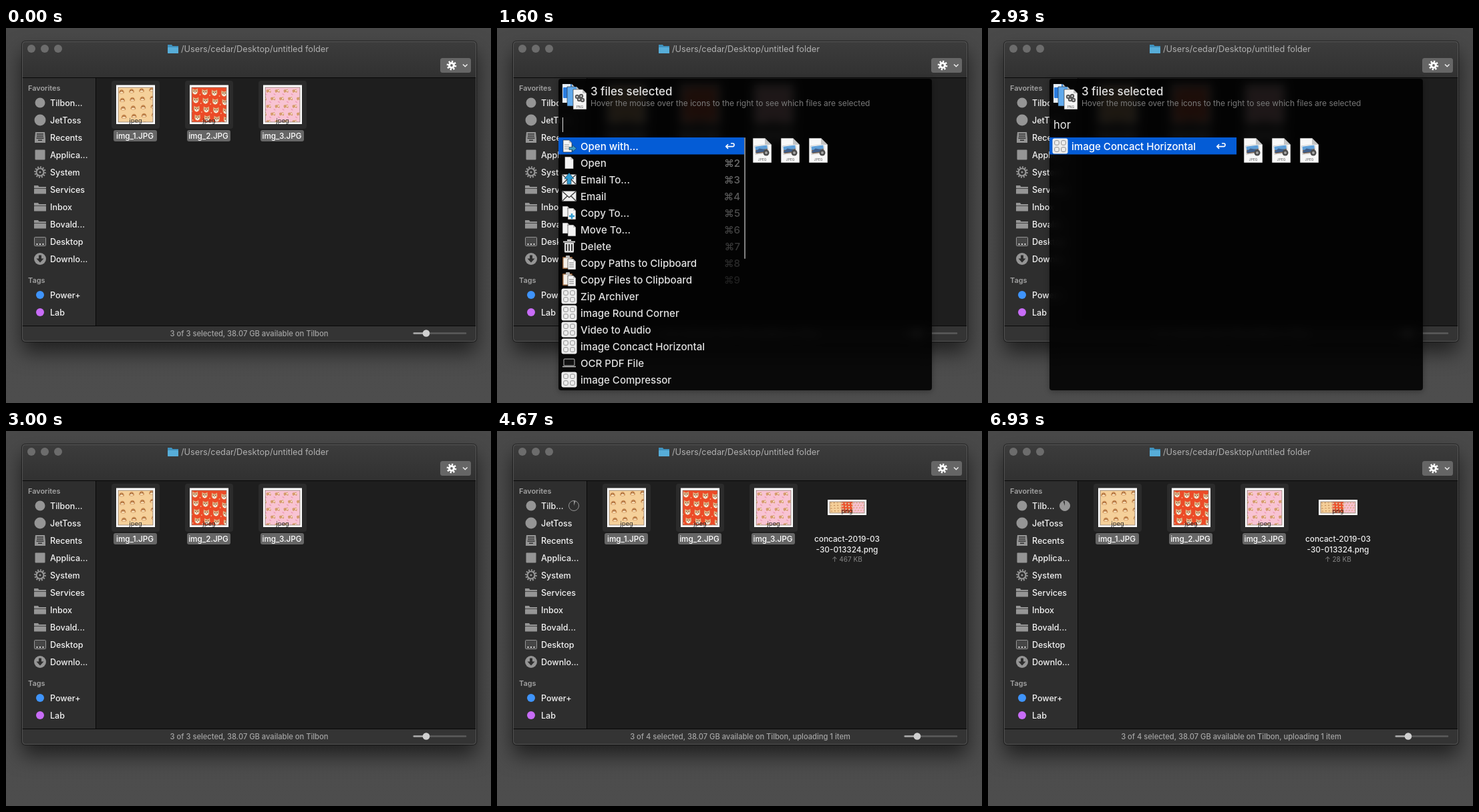
Animation, 726 px wide and 562 px high, one loop 6.99 s. Source, as an HTML page:

```html
<!DOCTYPE html>
<html lang="en">
<head>
<meta charset="utf-8">
<title>Join images from a file menu</title>
<style>
html, body { margin: 0; width: 100%; height: 100%; overflow: hidden; background: #4b4b4b; }
#stage { position: relative; width: 726px; height: 562px; overflow: hidden;
  background: linear-gradient(#494949, #4d4d4d); }
svg { display: block; }
#stage > svg, #popup { position: absolute; left: 0; top: 0; }
text { font-family: Inter, sans-serif; }
#shadow { position: absolute; left: 24px; top: 20px; width: 680px; height: 450px; border-radius: 5px;
  box-shadow: 0 16px 30px rgba(0,0,0,.58), 0 0 1px 1px rgba(0,0,0,.5); }
#popup { left: 92px; top: 76px; width: 559px; height: 467px; border-radius: 4px; overflow: hidden;
  background: rgba(0,0,0,.88); backdrop-filter: blur(7px); box-shadow: 0 2px 9px rgba(0,0,0,.3); }
</style>
</head>
<body>
<div id="stage">
  <div id="shadow"></div>
  <svg id="finder" width="726" height="562"></svg>
  <div id="popup"><svg id="menu" width="559" height="467" viewBox="92 76 559 467"></svg></div>
</div>
<script>
const LOOP = 6990, OPEN = 1595, CLOSE = 2995, RESULT = 3470;
const $ = id => document.getElementById(id);

// SVG helpers
const text = (x, y, size, fill, s, more = '') =>
  `<text x="${x}" y="${y}" font-size="${size}" fill="${fill}" ${more}>${s}</text>`;
const rect = (x, y, w, h, fill, r = 0, more = '') =>
  `<rect x="${x}" y="${y}" width="${w}" height="${h}" rx="${r}" fill="${fill}" ${more}/>`;
const circle = (x, y, r, fill, more = '') =>
  `<circle cx="${x}" cy="${y}" r="${r}" fill="${fill}" ${more}/>`;
const path = (d, fill, more = '') => `<path d="${d}" fill="${fill}" ${more}/>`;
const line = (d, color, w = 1, more = '') =>
  path(d, 'none', `stroke="${color}" stroke-width="${w}" ${more}`);
const at = (x, y, s, more = '') => `<g transform="translate(${x} ${y}) ${more}">${s}</g>`;
const MID = 'text-anchor="middle"', BOLD = 'font-weight="500"';

const gear = (r, teeth, w, color) =>
  circle(0, 0, r, 'none', `stroke="${color}" stroke-width="${w}"`) +
  circle(0, 0, r + w / 2 + 1, 'none', `stroke="${color}" stroke-width="2.4" pathLength="${2 * teeth}" stroke-dasharray="1 1"`);

const doc = (x, y, w, h, fold = w / 3, fill = '#f4f4f4') =>
  path(`M${x} ${y}h${w - fold}l${fold} ${fold}v${h - fold}h${-w}z`, fill, 'stroke="#222" stroke-width=".6"') +
  path(`M${x + w - fold} ${y}v${fold}h${fold}z`, '#c4c4c4');

// Repeating patterns inside the picture thumbnails
const motifs = [
  path('M-4.5 2.500a4.5 5.500 0 0 1 9 0q-4.500 3 -9 0z', '#c98a50') + path('M-3 2.500a3 2.3 0 0 1 6 0q-3 2 -6 0z', '#f6dcb4') +
    circle(-1.5, -.4, .6, '#6b4026') + circle(1.5, -.4, .6, '#6b4026'),
  path('M-4.5 -5l3 2h3l3 -2l.5 6q-1.5 4 -5 4t-5 -4z', '#dfb184') + path('M-3.5 2q3.5 -3 7 0q-1 3 -3.5 3t-3.5 -3z', '#fbeede') +
    circle(-1.8, -.6, .7, '#553322') + circle(1.8, -.6, .7, '#553322') + circle(0, 1.8, .8, '#553322'),
  path('M-4 -1q0 -2 2 -2h3l2 -1v2l1 1v3h-2v-1h-3v1h-2z', '#d59b6c') + circle(2, -1, 1.2, '#fff0df') +
    line('M-6 4l3 2', '#ec96b4', 1.5)
];
const grounds = [['#f5d09a', 15, 12.5, -1], ['#ec4b27', 14.5, 13, 1], ['#f8c3d3', 13, 11.5, 0]];

function picture(k, x, y, w, h) {
  const [color, dx, dy, slope] = grounds[k];
  let s = rect(0, 0, 52, 52, color);
  for (let r = 0; r < 5; r++)
    for (let c = -1; c < 5; c++) {
      const px = 5 + c * dx + (k === 2 ? r % 2 * dx / 2 : r * 1.2), py = 6 + r * dy + c * slope;
      s += at(px, py, motifs[k], 'scale(.88)');
      if (k === 1) s += circle(px + 7.5, py + 5, .9, '#f9b38c');
    }
  return `<svg x="${x}" y="${y}" width="${w}" height="${h}" viewBox="0 0 52 52" preserveAspectRatio="none">${s}</svg>`;
}

const badge = (x, y, s) => text(x, y, 9, '#222', s, `${MID} style="font-family:'DejaVu Sans',sans-serif"`);

function thumbnail(k) {
  const x = 158 + 110 * k, mid = x + 36;
  return rect(x, 79, 72, 72, '#2b2b2b', 4) + rect(x + 7, 85.5, 58, 58.5, '#fff') +
    picture(k, x + 10, 89, 52, 52) +
    rect(x + 10, 89, 52, 52, 'none', 0, 'stroke="#8b7b70" stroke-width=".8"') +
    badge(mid, 141.5, 'jpeg') + rect(mid - 33, 153, 65, 17, '#666', 3) +
    text(mid - 1, 165.5, 11.7, '#fff', `img_${k + 1}.JPG`, MID + ' ' + BOLD);
}

const GREY = '#959595';
const folder = path('M-9 -6h6l1.5 2h10.500v2h-18z', GREY) + rect(-9, -1.3, 18, 7.8, GREY, .5);
const sideItems = [
  ['Tilbon...', circle(0, 0, 7.5, GREY)],
  ['JetToss', circle(0, 0, 8.5, GREY)],
  ['Recents', path('M-7 -8h14l1 10v6h-16v-6z', GREY) + line('M-5 -5h10M-5 -2h10M-5.500 1h11', '#2e2e2e', 1.3) + rect(-3, 3.500, 6, 1.5, '#2e2e2e')],
  ['Applica...', rect(-7.5, -7.5, 15, 15, GREY, 1)],
  ['System', gear(5.5, 12, 2.2, GREY) + circle(0, 0, 1.6, GREY)],
  ['Services', folder], ['Inbox', folder], ['Bovald...', folder],
  ['Desktop', rect(-8.5, -6.5, 17, 13, '#454545', 1, `stroke="${GREY}"`) + line('M-5.500 4h11', '#ddd', 2, 'stroke-dasharray="2 2.500"')],
  ['Downlo...', circle(0, 0, 9, GREY) + path('M-2 -5.500h4v5h3.500l-5.500 6l-5.500 -6h3.500z', '#2e2e2e')]
];

$('finder').innerHTML =
  `<defs><linearGradient id="bar" x2="0" y2="1"><stop stop-color="#3c3c3c"/><stop offset="1" stop-color="#313131"/></linearGradient></defs>` +
  rect(24, 20, 680, 450, '#1e1e1e', 5) +
  path('M24 75h110v371h-110z', '#2e2e2e') +
  path('M24 74v-49q0 -5 5 -5h670q5 0 5 5v49z', 'url(#bar)') +
  path('M24 447h680v18q0 5 -5 5h-670q-5 0 -5 -5z', '#343434') +
  line('M24 74.500h680M134.500 75v371M24 446.500h680', '#080808') +
  rect(24.5, 20.5, 679, 449, 'none', 5, 'stroke="#686868" stroke-opacity=".65"') +
  [38, 58, 78].map(x => circle(x, 31, 6, '#6c6c6c')).join('') +
  path('M242 25h6l1.500 2h8.500v11h-16z', '#3f91bd') + rect(242, 29, 16, 9, '#57add8', 1) +
  text(262, 36, 12.75, '#b0b0b0', '/Users/cedar/Desktop/untitled folder') +
  rect(650, 45, 46, 22, '#666', 3.5) + at(667, 56, gear(3.5, 8, 3.2, '#fff')) +
  line('M684 54.500l3.300 3.300l3.300 -3.300', '#eee', 1.5) +
  text(33, 94, 10.9, '#a2a2a2', 'Favorites', 'font-weight="600"') +
  text(33, 382, 10.9, '#a2a2a2', 'Tags', 'font-weight="600"') +
  sideItems.map(([name, icon], i) => at(51, 112 + 26 * i, icon +
    text(15, 5, 12.5, '#f2f2f2', name, BOLD + (i ? '' : ' id="drive"')))).join('') +
  circle(51, 400, 6, '#3f94fb') + text(66, 405, 12.5, '#f2f2f2', 'Power+', BOLD) +
  circle(51, 426, 6, '#c86cf7') + text(66, 431, 12.5, '#f2f2f2', 'Lab', BOLD) +
  [0, 1, 2].map(thumbnail).join('') +
  text(364, 462, 11.15, '#a4a4a4', '', `id="status" ${MID} ${BOLD}`) +
  line('M610 457.500h78', '#5b5b5b', 2.5, 'stroke-linecap="round"') +
  line('M611 457.500h18', '#aaa', 2.5, 'stroke-linecap="round"') + circle(629, 457.5, 5.3, '#d0d0d0') +
  `<g id="result">` + rect(495, 103, 58, 23, '#fff') +
  [0, 1, 2].map(k => picture(k, 498 + 17.33 * k, 106, 17.33, 17)).join('') +
  rect(498, 106, 52, 17, 'none', 0, 'stroke="#8b7b70" stroke-width=".8"') + badge(524, 123, 'png') +
  text(524, 166, 11.8, '#ededed', 'concact-2019-03', MID + ' ' + BOLD) +
  text(524, 182, 11.8, '#ededed', '-30-013324.png', MID + ' ' + BOLD) +
  text(524, 196, 10, '#858585', '', `id="size" ${MID}`) +
  circle(115, 112, 7.5, 'none', `stroke="${GREY}"`) + path('', GREY, 'id="pie"') + `</g>`;

// Menu icons, each centred on its own origin
const arrow = (d, fill) => path(d, fill, 'stroke="#17384a" stroke-width=".6"');
const envelope = rect(-10.5, -7.5, 21, 15, '#eee') + line('M-10 -7l10 9l10 -9M-10 7l7 -7M10 7l-7 -7', '#333', 1.2);
const page = doc(-6.5, -9, 13, 18);
const pages = doc(-10, -10, 11, 16) + doc(-2, -7, 12, 17);
const clipboard = rect(-10, -9, 15, 18, '#8e5d36', 1) + rect(-8.5, -7.5, 12, 15, '#f4efe8') +
  rect(-5, -11, 6, 4, '#bbb', 1) + doc(-2, -6, 12, 16) + line('M0 0h7M0 3h7M0 6h7', '#777');
const grid = rect(-11.5, -11.5, 23, 23, '#eee', 3) +
  [-5, 5].map(x => [-5, 5].map(y => rect(x - 3.3, y - 3.3, 6.6, 6.6, 'none', 2, 'stroke="#8b8b8b"')).join('')).join('');
const items = [
  ['Open with...', doc(-9, -9, 13, 18) + line('M-7 -2h7M-7 1h7M-7 4h7', '#999') + arrow('M0 1.500h5v-3l6 5l-6 5v-3h-5z', '#3f9bc4')],
  ['Open', page],
  ['Email To...', envelope + arrow('M-3 7v-8h-4l7 -9l7 9h-4v8z', '#2e9ad0')],
  ['Email', envelope],
  ['Copy To...', pages + line('M0 5h8M4 1v8', '#2e9ad0', 2.5)],
  ['Move To...', pages],
  ['Delete', path('M-7 -5h14v13q0 1.500 -1.500 1.500h-11q-1.500 0 -1.500 -1.500z', '#ddd') + line('M-9 -6.500h18M-3 -9h6', '#ddd', 1.8) +
    line('M-4 -3v10M0 -3v10M4 -3v10', '#111', 1.6)],
  ['Copy Paths to Clipboard', clipboard],
  ['Copy Files to Clipboard', clipboard],
  ['Zip Archiver', grid],
  ['image Round Corner', grid],
  ['Video to Audio', grid],
  ['image Concact Horizontal', grid],
  ['OCR PDF File', rect(-8, -6, 16, 10, '#111', 1, 'stroke="#bbb"') + line('M-10 5.500h20', '#bbb', 1.6)],
  ['image Compressor', grid]
];

const photo = rect(-10, -6.5, 20, 13, '#fff', 0, 'stroke="#bbb" stroke-width=".6"') + rect(-9, -5.5, 18, 6, '#5f9fd8') +
  rect(-9, 0, 18, 5.5, '#7b6350') + path('M-9 2l6 -4l12 4v2h-18z', '#3f5f8c');
const jpegDoc = x => doc(x, 165, 28, 37, 10, '#f8f8f8') + at(x + 13, 182, photo, 'rotate(-7)') +
  circle(x + 20, 187, 4.5, '#4c4c4c') + circle(x + 20, 187, 2, '#a5a5a5') +
  text(x + 14, 199, 5, '#555', 'JPEG', MID);

const header =
  doc(98, 84, 20, 28, 6, '#3d8de0') + rect(98, 84, 12, 28, '#e7f1fb') + rect(99, 89, 8, 16, '#2a7de0', 1) +
  doc(105, 88, 20, 29, 6, '#60a9ec') + doc(114, 92, 20, 30, 6) +
  [[120, 103], [126, 102], [123, 107], [128, 108]].map(([x, y]) => circle(x, y, 3.2, '#555') + circle(x, y, 1.3, '#ccc')).join('') +
  text(124, 120, 5, '#555', 'PNG', MID) +
  text(140, 101, 16.9, '#e2e2e2', '3 files selected', BOLD) +
  text(140, 117, 11.95, '#787878', 'Hover the mouse over the icons to the right to see which files are selected') +
  [383, 425, 467].map(jpegDoc).join('');

function row([name, icon], i) {
  const y = 164 + 25 * i;
  const hint = i === 0
    ? line(`M350 ${y + 9}h3q2 0 2 2.300t-2 2.300h-10m3 -3.300l-3.300 3.300l3.300 3.300`, '#fff', 1.6)
    : i < 9 ? text(364, y + 19, 15, '#7c7c7c', '⌘' + (i + 1), `text-anchor="end" ${BOLD} opacity="${1 - i * .095}"`) : '';
  return at(108, y + 13, icon) + text(125, y + 18.5, 15.05, i ? '#e2e2e2' : '#fff', name, BOLD) + hint;
}

let shown;
function drawMenu(query, caret) {
  if (shown === query + caret) return;
  shown = query + caret;
  const found = items.filter(([name]) => name.toLowerCase().includes(query));
  const full = found.length > 8;
  $('menu').innerHTML = header + text(98, 151, 16.6, '#ececec', query) +
    (caret ? rect(98 + [0, 10, 20, 27][query.length], 134, 1, 22, '#ddd') : '') +
    rect(92, 164, full ? 278 : 280, 25.5, '#045cd6') + found.map(row).join('') +
    (full ? rect(370, 164, 2, 182, '#808080', 1) : '');
}

function drawUpload(t) {
  const total = 495, step = Math.max(0, Math.min(8, 1 + Math.floor((t - 4870) / 220)));
  const left = t < 4130 ? total : Math.round(467 - 439 * step / 8);
  const part = 1 - left / total, a = 2 * Math.PI * part;
  $('size').textContent = `↑ ${left} KB`;
  $('pie').setAttribute('d',
    `M115 112v-7.500A7.500 7.500 0 ${+(part > .5)} 1 ${115 + 7.5 * Math.sin(a)} ${112 - 7.5 * Math.cos(a)}z`);
}

function frame() {
  const t = performance.now() % LOOP;
  const open = t >= OPEN && t < CLOSE, done = t >= RESULT;
  $('popup').style.display = open ? '' : 'none';
  if (open) drawMenu('hor'.slice(0, [1870, 2000, 2130].filter(k => t >= k).length), t < 2650);
  $('result').style.display = done ? '' : 'none';
  if (done) drawUpload(t);
  $('drive').textContent = done ? 'Tilb...' : 'Tilbon...';
  $('status').textContent = `3 of ${done ? 4 : 3} selected, 38.07 GB available on Tilbon${done ? ', uploading 1 item' : ''}`;
  requestAnimationFrame(frame);
}
frame();
</script>
</body>
</html>
```
